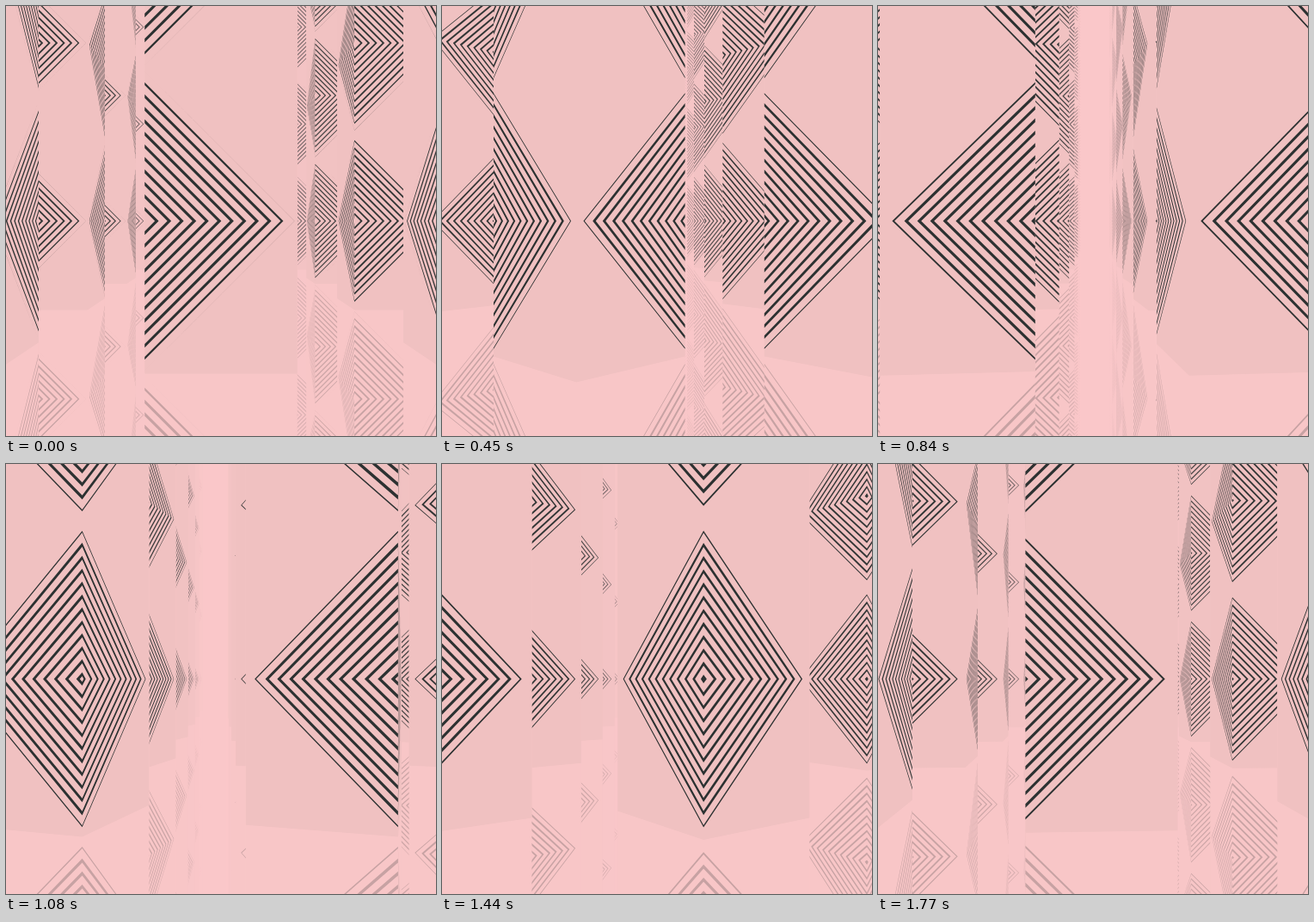
Recreate the animation shown at these times as an HTML page with a canvas. Size 500 px wide and 500 px high, loop 1.8 s.

```html
<!DOCTYPE html>
<html lang="en">
<head>
<meta charset="utf-8">
<title>Turning columns</title>
<style>
  html, body { margin: 0; width: 100%; height: 100%; overflow: hidden; background: #fac7c9; }
  canvas { display: block; }
</style>
</head>
<body>
<canvas id="stage" width="500" height="500"></canvas>
<script>
const ctx = document.getElementById('stage').getContext('2d');
const LOOP = 1800, STEP = 30;
const FOCAL = 694.4, MID = 250;
const ROWS = 6, FIRST_ROW = 4.412, ROW_GAP = 2.8, COLUMN_GAP = 2;
const RING_GAP = 0.082, RING_WIDTH = 0.025, RING_TIME = 300;
const FOG = [250, 199, 201], WALL = [240, 193, 193], INK = [44, 49, 49];
const MIRROR = 0.25;
const CORNERS = [[-.5, -.5], [.5, -.5], [.5, .5], [-.5, .5]];

// Colour c faded into the fog; 1 keeps it whole.
const fade = (c, keep) =>
  `rgb(${c.map((v, i) => Math.round(FOG[i] + (v - FOG[i]) * keep)).join()})`;

const project = (x, y, z) => [MID + FOCAL * x / z, MID - FOCAL * y / z];

function addPolygon(path, points) {
  points.forEach(([x, y], i) => i ? path.lineTo(x, y) : path.moveTo(x, y));
  path.closePath();
}

function fill(path, color) {
  ctx.fillStyle = color;
  ctx.fill(path);
}

// Rings shrink toward the centre and thicken as they leave the rim.
function ringsAt(t) {
  const phase = 0.97 - (t / RING_TIME) % 1, rings = [];
  for (let k = 0; k < 14; k++) {
    const r = RING_GAP * (k + phase);
    if (r <= 0 || r >= 0.985) continue;
    const half = RING_WIDTH / 2 * Math.min(1, (0.985 - r) / 0.12);
    rings.push([r + half, Math.max(0, r - half)]);
  }
  return rings;
}

function drawColumn(cx, cz, angle, rings) {
  const cos = Math.cos(angle), sin = Math.sin(angle);
  const corners = CORNERS.map(([x, z]) =>
    [cx + x * cos + z * sin, cz + z * cos - x * sin]);
  const screenX = corners.map(([x, z]) => MID + FOCAL * x / z);
  if (Math.max(...screenX) < 0 || Math.min(...screenX) > 500) return;

  const whole = new Path2D(), wall = new Path2D();
  const marks = new Path2D(), mirrored = new Path2D();
  const cells = Math.ceil((MID * (cz + .75) / FOCAL + 1) / 2);

  for (let i = 0; i < 4; i++) {
    const j = (i + 1) % 4, a = corners[i], b = corners[j];
    if (screenX[i] >= screenX[j]) continue;
    const left = screenX[i], right = screenX[j];
    addPolygon(whole, [[left, 0], [right, 0], [right, 500], [left, 500]]);
    addPolygon(wall, [[left, 0], [right, 0], project(b[0], -1, b[1]), project(a[0], -1, a[1])]);

    const [hub, rim] = i % 2 ? [b, a] : [a, b];
    const at = (u, y) => project(
      hub[0] + (rim[0] - hub[0]) * u, y, hub[1] + (rim[1] - hub[1]) * u);
    for (let cell = -cells; cell <= cells; cell++) {
      const y = 2 * cell, path = cell < 0 ? mirrored : marks;
      for (const [out, inn] of rings) {
        addPolygon(path, [at(0, y + out), at(out, y), at(0, y - out),
                          at(0, y - inn), at(inn, y), at(0, y + inn)]);
      }
    }
  }

  const depth = Math.max(0, Math.min(1, (cz - 4.5) / 14.5));
  const keep = 1 - depth * depth;
  fill(whole, fade(WALL, keep * MIRROR));
  fill(mirrored, fade(INK, keep * MIRROR));
  fill(wall, fade(WALL, keep));
  fill(marks, fade(INK, keep));
}

function draw(t) {
  const angle = Math.PI * t / LOOP, shift = COLUMN_GAP * t / LOOP;
  const rings = ringsAt(t);
  ctx.fillStyle = fade(FOG, 1);
  ctx.fillRect(0, 0, 500, 500);
  for (let row = ROWS - 1; row >= 0; row--) {
    const places = [];
    for (let n = -5; n <= 6; n++) places.push(n * COLUMN_GAP - shift);
    // Outer columns first, so those nearer the view axis cover them.
    places.sort((a, b) => Math.abs(b) - Math.abs(a));
    for (const x of places) drawColumn(x, FIRST_ROW + row * ROW_GAP, angle, rings);
  }
}

const start = performance.now();
let shown = -1;
function tick() {
  const t = Math.floor((performance.now() - start) % LOOP / STEP) * STEP;
  if (t !== shown) draw(shown = t);
  requestAnimationFrame(tick);
}
tick();
</script>
</body>
</html>
```
